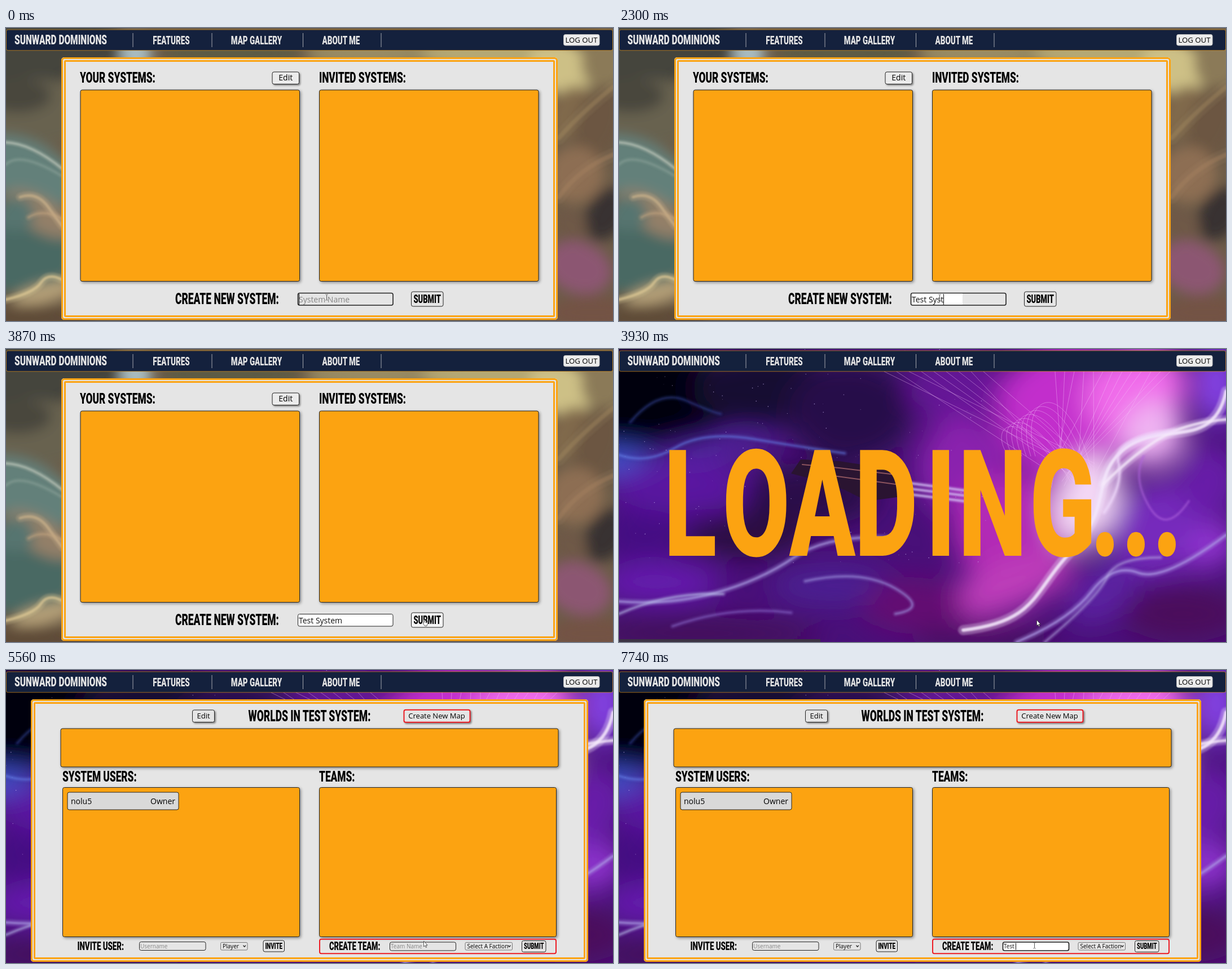
Write an HTML page that moves like this. It is 1076 by 520 pixels and loops after 8000 ms.

```html
<!DOCTYPE html>
<html lang="en">
<head>
<meta charset="utf-8">
<title>Create a system</title>
<style>
  html, body { margin: 0; width: 100%; height: 100%; overflow: hidden; background: #14213d; }
  svg { display: block; width: 1076px; height: 520px; }
  text { white-space: pre; font-family: "Open Sans", "Noto Sans", sans-serif; }
  .head { font-family: Roboto, "Liberation Sans", sans-serif; font-weight: 900; }
  .raised { filter: drop-shadow(2px 2px 1.5px rgba(0, 0, 0, .45)); }
  .panel { filter: drop-shadow(2px 2px 2.5px rgba(0, 0, 0, .4)); }
</style>
</head>
<body>
<svg id="stage" viewBox="0 0 1076 520" xmlns="http://www.w3.org/2000/svg"></svg>
<script>
const LOOP = 8000;
const ORANGE = '#fca311', GREY = '#e5e5e5', NAVY = '#14213d', INK = '#222';
const CONDENSE = 0.65; // shared width of the display face

let seed = 11;
const random = () => (seed = (seed * 16807) % 2147483647) / 2147483647;

const rect = (x, y, w, h, fill, extra = '') =>
  `<rect x="${x}" y="${y}" width="${w}" height="${h}" fill="${fill}" ${extra}/>`;

const box = (x, y, w, h, fill, extra = '') =>
  rect(x, y, w, h, fill, `rx="3" stroke="${INK}" ${extra}`);

const body = (x, y, size, str, extra = '') =>
  `<text x="${x}" y="${y}" font-size="${size}" ${extra}>${str}</text>`;

const head = (x, y, size, str, extra = '') =>
  `<text class="head" transform="translate(${x} ${y}) scale(${CONDENSE} 1)" font-size="${size}" ${extra}>${str}</text>`;

const MID = 'text-anchor="middle"';

const blobs = list => list.map(([x, y, rx, ry, color, turn = 0]) =>
  `<ellipse rx="${rx}" ry="${ry}" fill="${color}" transform="translate(${x} ${y}) rotate(${turn})"/>`).join('');

const wisp = (d, color, width, opacity) =>
  `<path d="${d}" fill="none" stroke="${color}" stroke-width="${width}" opacity="${opacity}" stroke-linecap="round"/>`;

const softWisp = (d, color, width, opacity = 0.8) =>
  `<g filter="url(#soft)">${wisp(d, color, width * 3, opacity * 0.35)}${wisp(d, color, width, opacity)}</g>`;

const card = (x, w) =>
  rect(x, 52, w, 466, GREY, 'rx="5"') +
  rect(x + 1.5, 53.5, w - 3, 463, 'none', `rx="4" stroke="${ORANGE}" stroke-width="3"`) +
  rect(x + 6.5, 58.5, w - 13, 453, 'none', `rx="1" stroke="${ORANGE}" stroke-width="3"`);

const panel = (x, y, w, h) => box(x, y, w, h, ORANGE, 'class="panel"');

const select = (x, w, str) =>
  rect(x, 483.5, w, 13.5, GREY, 'rx="2" stroke="#777"') + body(x + 3.5, 494, 10, str) +
  `<path d="M${x + w - 7.5} 488.8l2.2 2.4 2.2-2.4" fill="none" stroke="${INK}" stroke-width="1.3"/>`;

const blurDef = (id, amount) =>
  `<filter id="${id}" filterUnits="userSpaceOnUse" x="-100" y="-100" width="1276" height="720">
    <feGaussianBlur stdDeviation="${amount}"/></filter>`;

function duskSky() {
  return rect(0, 0, 1076, 520, '#6c5c48') + `<g filter="url(#haze)">` + blobs([
    [20, 30, 190, 70, '#45443c'], [40, 150, 130, 60, '#68624f'], [20, 120, 60, 30, '#4a473e'],
    [230, 45, 28, 30, '#a9bcc0'], [400, 45, 120, 25, '#5d5b45'], [640, 45, 110, 25, '#9a8c64'],
    [860, 45, 130, 30, '#b5a873'], [985, 70, 60, 45, '#cdc086', 30], [1060, 60, 40, 50, '#8b7a58'],
    [1000, 150, 35, 50, '#80694c', 30], [1050, 170, 40, 70, '#6c5743', 20],
    [1010, 260, 50, 50, '#8d6e52', -30], [1065, 330, 35, 50, '#393330', 30],
    [1000, 350, 28, 35, '#6e5947', -40], [1015, 425, 60, 45, '#8c5672', 20], [1040, 505, 80, 30, '#735345']
  ]) + blobs([
    [35, 255, 100, 55, '#64807a', 25], [20, 400, 110, 70, '#4a6963'], [60, 330, 70, 30, '#937f68', 30],
    [15, 330, 35, 30, '#57756f'], [70, 470, 60, 17, '#b5a078', -15], [40, 515, 120, 24, '#5e4c38']
  ]) + '</g>' +
  softWisp('M0 203Q45 205 100 250', '#b7c1b4', 3) +
  softWisp('M0 242Q25 218 98 262', '#8ca29a', 3, 0.5) +
  softWisp('M25 300Q55 290 75 318T100 352', '#d2b88e', 5, 0.6) +
  softWisp('M40 336Q65 320 98 338', '#c4a680', 4, 0.5) +
  softWisp('M0 482Q50 470 62 452T98 446', '#dfc995', 5, 0.7) +
  softWisp('M980 195Q1020 150 1076 105', '#a58c62', 8, 0.4) +
  softWisp('M980 300Q1015 250 1076 225', '#a98463', 8, 0.4);
}

function violetSky() {
  let stars = '', rays = '';
  for (let i = 0; i < 150; i++) {
    stars += `<circle cx="${(random() * 650).toFixed(1)}" cy="${(random() * 380).toFixed(1)}" r="${(0.3 + random() * 0.5).toFixed(2)}"/>`;
  }
  for (let i = 0; i < 22; i++) {
    const x = i < 9 ? 470 + i * 22 : 620 + i * 17;
    rays += `M${x} 40L${(760 + random() * 90).toFixed(0)} ${(190 + random() * 60).toFixed(0)}`;
  }
  for (let i = 0; i < 7; i++) {
    rays += `M${690 + i * 8} 190C${650 + i * 9} ${130 - i * 9} ${715 + i * 14} ${95 - i * 10} ${800 + i * 7} 235`;
  }
  const arc = 'M1076 75C1060 155 1000 145 955 153S870 185 858 240S845 310 790 372S735 485 610 499';
  return rect(0, 0, 1076, 520, '#491079') + '<g filter="url(#cloud)">' + blobs([
    [50, 85, 160, 95, '#04030c'], [260, 70, 130, 70, '#170a30'], [410, 110, 110, 90, '#270a49'],
    [0, 200, 60, 25, '#3f58d6'], [170, 175, 110, 18, '#5229a6', -8], [110, 245, 130, 50, '#5a16a0'],
    [340, 260, 120, 55, '#2a0a48'], [40, 330, 90, 45, '#441083'], [225, 330, 110, 40, '#2b093f'],
    [70, 415, 110, 35, '#661fb0'], [380, 420, 110, 35, '#4b2193'], [140, 505, 220, 28, '#430b58'],
    [600, 70, 90, 60, '#651696'], [610, 210, 80, 90, '#8a20ae']
  ]) + blobs([
    [800, 110, 130, 120, '#c22fcc'], [700, 320, 110, 100, '#b22ab6'], [915, 75, 95, 75, '#f06bea', -25],
    [945, 150, 55, 60, '#efb4f2', 35], [1060, 60, 35, 75, '#8846ec'], [690, 420, 120, 45, '#bd3cb9', -20],
    [520, 455, 90, 50, '#630f72'], [830, 270, 58, 85, '#f4d8f5', 20], [960, 320, 90, 80, '#762abc', -30],
    [1045, 235, 55, 65, '#681aa8'], [860, 430, 75, 45, '#5c22a2', -40], [1000, 470, 110, 50, '#4c0e5b'],
    [1050, 350, 50, 35, '#9136d0', -30], [650, 515, 130, 25, '#46105f']
  ]) + '</g>' +
  `<g fill="#cbb8f4" opacity=".75">${stars}</g>` +
  wisp(rays, '#f4c9fb', 0.8, 0.5) +
  softWisp(arc, '#f3e6fb', 6, 0.9) +
  softWisp('M858 240Q920 180 965 155T1076 125', '#f5eafa', 5, 0.8) +
  softWisp('M860 290Q895 240 885 200T985 145', '#efd9fa', 3) +
  softWisp('M705 520Q800 480 838 430T920 397T1076 330', '#ae9ce6', 4, 0.7) +
  softWisp('M755 520Q850 440 865 405T960 370', '#b7aee4', 3, 0.5) +
  softWisp('M0 448Q90 455 170 433T310 370T480 335', '#a99be0', 4, 0.7) +
  softWisp('M0 470Q90 430 185 435', '#b7bce8', 3, 0.6) +
  softWisp('M95 492Q200 455 305 468', '#8e70cf', 3, 0.5) +
  softWisp('M330 412Q430 390 490 425T490 470', '#9d91dc', 3, 0.6) +
  softWisp('M0 188Q50 205 100 175T240 160T400 185', '#637ce4', 3, 0.55) +
  softWisp('M20 130Q70 70 120 92T180 115', '#3549a2', 3, 0.45) +
  softWisp('M930 190Q910 230 940 280T1010 270', '#b064dc', 2, 0.6) +
  '<path d="M305 221L322 196 390 199 470 211 500 235 500 262 440 270 400 250 340 230Z" fill="#2a1431"/>' +
  wisp('M325 205L390 211 490 223M380 225L490 240', '#a5646a', 2, 0.8) +
  softWisp('M500 236L612 251M500 246L612 260M500 256L612 270', '#d5c4f4', 2.5, 0.9);
}

function header() {
  const links = [[293, 'FEATURES'], [444, 'MAP GALLERY'], [594, 'ABOUT ME']];
  return rect(0.5, 3, 1075, 36.8, NAVY, `rx="3" stroke="${ORANGE}" stroke-opacity=".6"`) +
    head(15, 29, 23.8, 'SUNWARD DOMINIONS', `fill="${GREY}"`) +
    links.map(([x, str]) => head(x, 28.5, 20.7, str, `${MID} fill="${GREY}"`)).join('') +
    [225, 365, 526.5, 665].map(x => rect(x - 0.5, 9, 1, 25, '#a3a6ad')).join('') +
    rect(988.5, 11.5, 63.5, 19.5, '#ececec', 'rx="3" stroke="#bbb"') +
    body(1020, 26.3, 13.2, 'LOG OUT', MID);
}

function systemsPage() {
  return card(98, 880) +
    head(131, 96.5, 26.6, 'YOUR SYSTEMS:') + head(555, 96.5, 26.6, 'INVITED SYSTEMS:') +
    box(472, 78, 47.5, 21.5, '#ebebeb', 'class="raised"') + body(495.7, 93, 14, 'Edit', MID) +
    panel(132, 110, 388.5, 339.5) + panel(555.5, 110, 388.5, 339.5) +
    head(300, 490.3, 26.8, 'CREATE NEW SYSTEM:') +
    box(517.5, 470.5, 168.5, 21.5, GREY, 'id="nameBox"') +
    rect(519, 471.5, 0, 19.5, '#fff', 'id="nameFill"') +
    body(519, 487, 14, '', 'id="nameText"') + rect(519, 472, 1, 19, '#111', 'id="nameCaret"') +
    box(718.5, 468, 56.5, 26, GREY, 'id="submit"') + head(746.7, 487.7, 20, 'SUBMIT', MID);
}

function loadingPage() {
  const left = [80, 184, 302, 418, 544.5, 602, 728, 836, 891, 946];
  const xs = left.map(x => (x / CONDENSE).toFixed(1)).join(' ');
  return head(0, 367, 264, 'LOADING...', `x="${xs}" fill="${ORANGE}"`) +
    rect(0, 515, 357, 5, '#3c3344', 'id="status"');
}

function worldsPage() {
  const red = 'stroke="#ec1c24" stroke-width="2" rx="3"';
  return card(44, 988) +
    box(330.5, 71, 39, 21.5, GREY, 'class="raised"') + body(350, 86.3, 13, 'Edit', MID) +
    head(538, 90.5, 26.9, 'WORLDS IN TEST SYSTEM:', MID) +
    rect(705.5, 70.8, 117, 22, GREY, `${red} class="raised"`) + body(763.5, 86.3, 13, 'Create New Map', MID) +
    panel(97, 104, 882, 68) +
    head(100, 197.5, 26.6, 'SYSTEM USERS:') + head(555, 197.5, 26.6, 'TEAMS:') +
    panel(100.5, 208.5, 420, 265) + panel(555.5, 208.5, 420, 265) +
    box(109, 217, 197, 31, '#d9d9d9') +
    body(115, 238, 14, 'nolu5') + body(300, 238, 14, 'Owner', 'text-anchor="end"') +
    head(126.5, 497, 20.5, 'INVITE USER:') +
    box(236.5, 482.5, 117.5, 15, GREY) + body(238, 494, 10, 'Username', 'fill="#888"') +
    select(380.5, 47.5, 'Player') +
    box(456, 480, 37.5, 20, GREY) + head(474.7, 495, 15, 'INVITE', MID) +
    rect(556, 477.8, 419, 25.5, 'none', red) +
    head(573, 497, 20, 'CREATE TEAM:') +
    box(680.5, 483, 117, 15, GREY, 'id="teamBox"') +
    body(682, 494.3, 10, '', 'id="teamText"') + rect(682, 484.5, 1, 12, '#111', 'id="teamCaret"') +
    select(814, 83.5, 'Select A Faction') +
    box(914.5, 480.5, 42.5, 20, GREY) + head(935.7, 495.3, 14.6, 'SUBMIT', MID);
}

const pointers = `
  <path id="beam" d="M-2-5H-.5M.5-5H2M0-4.5V4.5M-2 5H-.5M.5 5H2" fill="none" stroke="#555"/>
  <path id="arrow" d="M0 0V10L2.3 8 3.8 11.5 5.3 10.8 3.8 7.4H6.6Z" fill="#fff" stroke="#333" stroke-width=".8"/>
  <path id="hand" d="M1 0Q2 0 2 1V4L6 5Q7 6 6.3 8L5.5 11H1.8L-1 7Q-1 5.5 0 6V1Q0 0 1 0Z" fill="#fff" stroke="#333" stroke-width=".8"/>`;

const stage = document.getElementById('stage');
stage.innerHTML =
  `<defs>${blurDef('haze', 11)}${blurDef('cloud', 24)}${blurDef('soft', 1.6)}</defs>` +
  `<g id="dusk">${duskSky()}</g><g id="violet">${violetSky()}</g>${header()}` +
  `<g id="systems">${systemsPage()}</g><g id="loading">${loadingPage()}</g><g id="worlds">${worldsPage()}</g>${pointers}`;

const el = id => document.getElementById(id);
const set = (id, attrs) => { for (const key in attrs) el(id).setAttribute(key, attrs[key]); };
const show = (id, on) => set(id, { display: on ? 'inline' : 'none' });

const NAME_KEYS = [360, 670, 950, 1230, 1380, 1720, 1930, 2020, 2300, 2480, 2570];
const TEAM_KEYS = [6920, 7130, 7340, 7620, 7740];
const typed = (str, keys, t) => str.slice(0, keys.filter(k => t >= k).length);

function field(id, x, value, hint, caretOn) {
  const label = el(id + 'Text');
  label.textContent = value || hint;
  label.setAttribute('fill', value ? '#111' : '#858585');
  const width = value ? label.getComputedTextLength() : 0;
  set(id + 'Caret', { x: Math.round(x + width) });
  show(id + 'Caret', caretOn);
}

function pointerAt(t) {
  if (t >= 5910) return ['beam', 736.5, 489];
  if (t >= 5870) return ['beam', 738.5, 486];
  if (t >= 3930) return ['arrow', 740.5, 481];
  const k = Math.min(1, Math.max(0, Math.floor((t - 3130) / 36) / 13));
  const p = k * k * (3 - 2 * k), q = 1 - p;
  const x = q * q * 568.5 + 2 * q * p * 655 + p * p * 740.5;
  const y = q * q * 478 + 2 * q * p * 492 + p * p * 480.5;
  return [x < 686 ? 'beam' : x < 718 ? 'arrow' : 'hand', x, y];
}

function render(t) {
  const first = t < 3930, last = t >= 5560;
  show('dusk', first);
  show('violet', !first);
  show('systems', first);
  show('loading', !first && !last);
  show('worlds', last);

  const [kind, x, y] = pointerAt(t);
  for (const id of ['beam', 'arrow', 'hand']) show(id, id === kind);
  set(kind, { transform: `translate(${x} ${y})` });

  if (first) {
    const fillEnd = t < 360 ? 519 : t >= 3600 ? 685 : Math.min(685, Math.max(609, x + 8));
    set('nameFill', { width: fillEnd - 519 });
    set('nameBox', { 'stroke-width': t < 3780 ? 1.6 : 1, fill: t < 3600 ? GREY : '#fff' });
    set('submit', { fill: kind === 'hand' ? '#f3f3f3' : GREY });
    field('name', 519, typed('Test System', NAME_KEYS, t), 'System Name', t < 20 || (t >= 360 && t < 3130));
  } else if (last) {
    const focused = t >= 6080;
    set('teamBox', { 'stroke-width': focused ? 1.7 : 1, fill: focused ? '#fff' : GREY });
    field('team', 682, typed('Test ', TEAM_KEYS, t), 'Team Name', (focused && t < 6610) || t >= 6920);
  } else {
    const faded = t < 4210 ? 0 : Math.min(5, Math.floor((t - 4210) / 42.5) + 1);
    set('status', { opacity: 1 - faded / 5 });
  }
}

const start = performance.now();
function tick() {
  render((performance.now() - start) % LOOP);
  requestAnimationFrame(tick);
}
tick();
</script>
</body>
</html>
```
